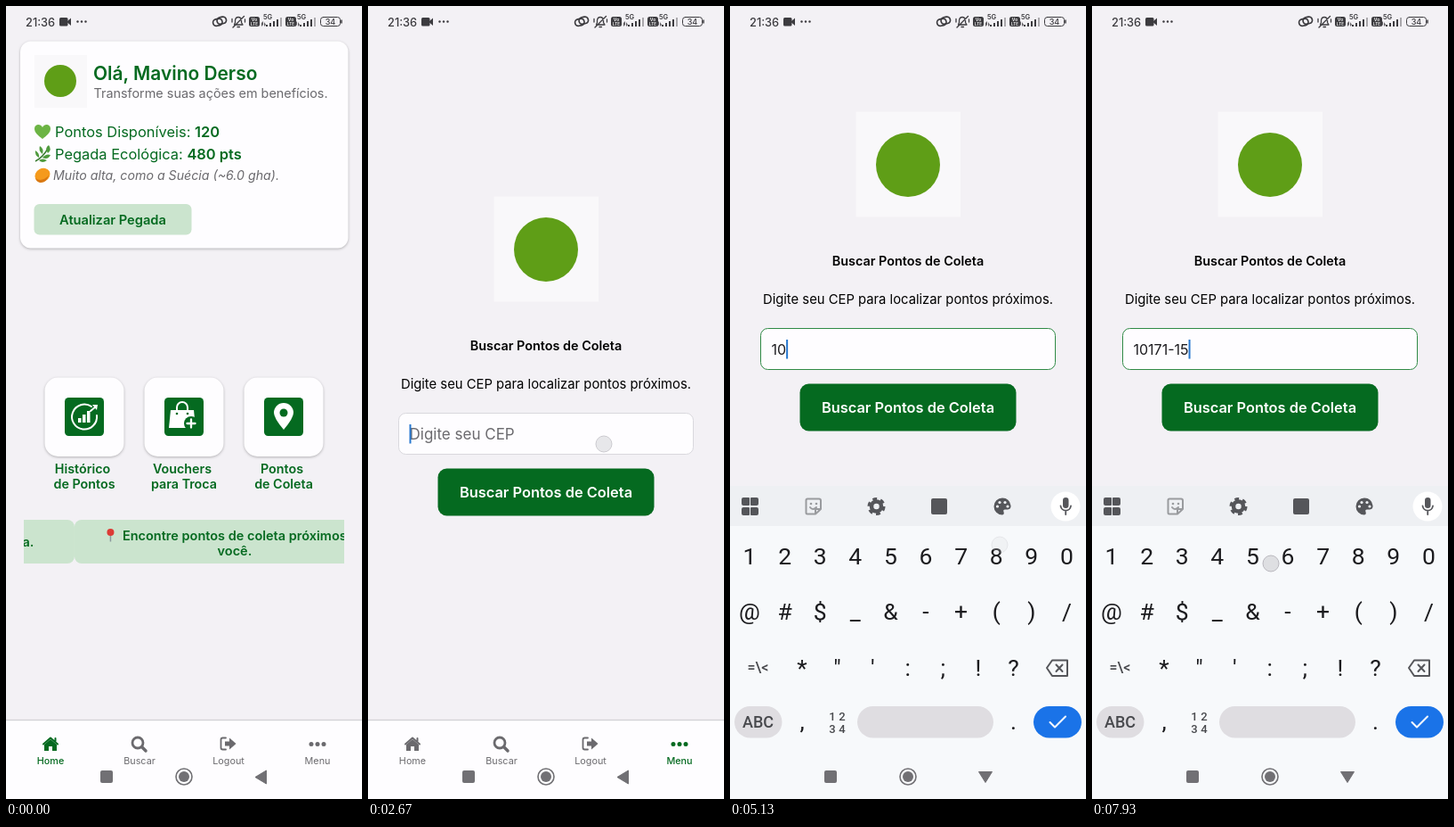
These frames come from a looping animation (400 px wide and 889 px high, 8 s). An HTML page:

```html
<!DOCTYPE html>
<html lang="pt-BR">
<head>
<meta charset="utf-8">
<title>Pontos de coleta</title>
<style>
  html, body { margin: 0; width: 100%; height: 100%; overflow: hidden; background: #f3f1f5; }
  svg { display: block; width: 400px; height: 889px; font-family: Inter, sans-serif; }
  .c { text-anchor: middle; }
  .m { font-weight: 500; }
  .b { font-weight: 600; }
  .green { fill: #056a20; }
  .grey { fill: #6b6a6e; }
  .line { fill: none; stroke: currentColor; stroke-linecap: round; stroke-linejoin: round; }
  .card { fill: #fefdff; filter: drop-shadow(0 1px 1.5px #0004); }
  .tab { color: #6b6a6e; fill: currentColor; font-size: 10.8px; text-anchor: middle; }
  .tab.on { color: #056a20; font-weight: 500; }
  #status { color: #3c3b3f; fill: #3c3b3f; }
  #keyboard { color: #55565a; fill: #55565a; }
  .keys { fill: #1c1c1f; font: 26.5px Roboto, sans-serif; text-anchor: middle; }
  .keys .small { font-size: 16px; font-weight: 500; fill: #48494d; }
  .keys .pill { font-size: 18px; font-weight: 500; fill: #48494d; }
</style>
</head>
<body>
<svg viewBox="0 0 400 889">
  <defs>
    <clipPath id="window"><rect x="20" y="576" width="360" height="49"/></clipPath>
    <g id="bars">
      <path d="M0 9h2v2h-2zM4 7h2v4h-2zM8 5h2v6h-2zM12 3h2v8h-2z"/>
      <path d="M16 1h2v10h-2z" opacity=".4"/>
      <text x="-3" y="3" font-size="7.5" class="b">5G</text>
      <path d="M-5 11v-4l2 -2v4zM-2 6v5l2 -2z" opacity=".8"/>
    </g>
    <g id="volte">
      <rect width="12" height="11" rx="2.5"/>
      <text x="6" y="5" font-size="5" class="c b" fill="#fff">Vo</text>
      <text x="6" y="9.6" font-size="4.5" class="c b" fill="#fff">LTE</text>
    </g>
  </defs>
  <rect width="400" height="889" fill="#f3f1f5"/>

  <g id="home">
    <rect class="card" x="16" y="39.5" width="368.5" height="232" rx="12"/>
    <rect x="32" y="55" width="59" height="59" fill="#f9f8fa"/>
    <circle cx="61" cy="84" r="18" fill="#5f9e17"/>
    <text class="green b" x="98" y="83" font-size="20.9">Olá, Mavino Derso</text>
    <text class="grey" x="98.5" y="103" font-size="14.4">Transforme suas ações em benefícios.</text>
    <path d="M41 149C36 145 32 142 32 137.5C32 132 39 131.5 41 136C43 131.5 50 132 50 137.5C50 142 46 145 41 149z" fill="#6cb444"/>
    <g fill="#4f9a3d">
      <path d="M33 174Q41 170 47 160" fill="none" stroke="#3d7d35" stroke-width="1.5"/>
      <path d="M47 165Q43 159 48 156Q52 161 47 165zM41 166Q36 162 38 157Q43 160 41 166zM37 170Q32 167 33 162Q38 165 37 170zM41 170Q45 165 50 167Q47 173 41 170zM37 173Q41 170 46 173Q41 177 37 173z"/>
    </g>
    <ellipse cx="41" cy="189.5" rx="8.8" ry="7.3" transform="rotate(-28 41 189.5)" fill="#f59a1c"/>
    <path d="M33 193Q40 198 48 190Q45 199 38 198Q34 197 33 193z" fill="#d97812"/>
    <g class="green" font-size="16.45">
      <text x="55" y="147">Pontos Disponíveis: <tspan class="b">120</tspan></text>
      <text x="55" y="172">Pegada Ecológica: <tspan class="b">480 pts</tspan></text>
    </g>
    <text class="grey" x="53" y="194.5" font-size="14.2" font-style="italic">Muito alta, como a Suécia (~6.0 gha).</text>
    <rect x="31.5" y="222" width="177" height="34.5" rx="6" fill="#cbe4ce"/>
    <text class="green b c" x="120" y="245" font-size="14.65">Atualizar Pegada</text>

    <g id="tiles"></g>

    <g clip-path="url(#window)">
      <g id="ticker" class="green b c" font-size="14.5">
        <g fill="#cbe4ce">
          <rect x="-283" y="576" width="360" height="49" rx="8"/>
          <rect x="77" y="576" width="360" height="49" rx="8"/>
          <rect x="437" y="576" width="360" height="49" rx="8"/>
        </g>
        <text x="25" y="606">a.</text>
        <path d="M117.5 591V600.5" stroke="#8b979c" stroke-width="1.5"/>
        <circle cx="117.5" cy="590" r="4" fill="#dc3b35"/>
        <text x="267.5" y="598.5">Encontre pontos de coleta próximos de</text>
        <text x="257" y="616">você.</text>
      </g>
    </g>
  </g>

  <g id="search">
    <rect x="141.5" y="213.5" width="117.5" height="118" fill="#f9f8fa"/>
    <circle cx="200" cy="273" r="36" fill="#5f9e17"/>
    <text class="b c" x="200" y="386" font-size="14.4">Buscar Pontos de Coleta</text>
    <text class="c" x="200" y="428.5" font-size="14.8">Digite seu CEP para localizar pontos próximos.</text>
    <rect id="field" x="34.5" y="456.5" width="331" height="46" rx="8" fill="#fefdff"/>
    <text id="value" x="46.5" y="486"></text>
    <rect id="caret" y="469" width="2" height="21.5" fill="#2878cf"/>
    <rect x="78.5" y="518.5" width="243" height="53" rx="10" fill="#056a20"/>
    <text class="b c" x="200" y="551" font-size="16.4" fill="#fff">Buscar Pontos de Coleta</text>
  </g>

  <g id="tabs">
    <rect y="800" width="400" height="89" fill="#fefdff"/>
    <rect y="799.8" width="400" height="1.4" fill="#d3d2d6"/>
    <g class="tab" id="homeTab">
      <path d="M50 822L57 828V835H52V830H48V835H43V828z"/>
      <path class="line" stroke-width="2" d="M42 827.5L50 820.5L58 827.5M55.5 821V824"/>
      <text x="50" y="850">Home</text>
    </g>
    <g class="tab">
      <circle class="line" cx="148" cy="826" r="6" stroke-width="2.8"/>
      <path class="line" stroke-width="3.5" d="M153 831L157 835"/>
      <text x="150" y="850">Buscar</text>
    </g>
    <g class="tab">
      <path class="line" stroke-width="1.8" d="M247 820.5H243.5Q241.5 820.5 241.5 822.5V831.5Q241.5 833.5 243.5 833.5H247"/>
      <path d="M246 824.5H251V820.5L258.5 827L251 833.5V829.5H246z"/>
      <text x="250" y="850">Logout</text>
    </g>
    <g class="tab" id="menuTab">
      <circle cx="343" cy="827.5" r="2.5"/><circle cx="350" cy="827.5" r="2.5"/><circle cx="357" cy="827.5" r="2.5"/>
      <text x="350" y="850">Menu</text>
    </g>
  </g>

  <g id="keyboard">
    <rect y="538" width="400" height="351" fill="#f7f9fb"/>
    <rect y="538" width="400" height="45" fill="#eef0f3"/>
    <path d="M15 551h6q1 0 1 1v7q0 1 -1 1h-6q-2 0 -2 -2v-5q0 -2 2 -2zM24 551h6q2 0 2 2v5q0 2 -2 2h-6q-1 0 -1 -1v-7q0 -1 1 -1zM15 562h6q1 0 1 1v7q0 1 -1 1h-6q-2 0 -2 -2v-5q0 -2 2 -2zM24 562h6q2 0 2 2v5q0 2 -2 2h-6q-1 0 -1 -1v-7q0 -1 1 -1z"/>
    <g opacity=".55">
      <path class="line" stroke-width="2" d="M87 552.5H100Q102 552.5 102 554.5V564L96 569.5H87Q85.5 569.5 85.5 568V554Q85.5 552.5 87 552.5M102 564H96V569.5M90 562Q93 566 97 562"/>
      <circle cx="91" cy="558" r="1.3"/><circle cx="97" cy="558" r="1.3"/>
    </g>
    <circle class="line" cx="164.5" cy="561" r="5.5" stroke-width="4.5"/>
    <circle class="line" cx="164.5" cy="561" r="8.3" stroke-width="3.5" stroke-dasharray="4.7 4" style="stroke-linecap:butt"/>
    <rect x="226" y="552" width="18" height="18" rx="2"/>
    <path d="M306 551.5A9.5 9.5 0 1 0 306 570.5Q308.5 570 307.5 567Q306.5 564.5 309 564.5H312Q316 564 315.5 560Q314 551.5 306 551.5z"/>
    <g fill="#eef0f3"><circle cx="300.5" cy="561" r="1.6"/><circle cx="303" cy="556.5" r="1.6"/><circle cx="309" cy="556.5" r="1.6"/><circle cx="312" cy="561" r="1.6"/></g>
    <circle cx="377" cy="561" r="16.5" fill="#fff"/>
    <rect x="374" y="551" width="6.5" height="12" rx="3.2"/>
    <path class="line" stroke-width="1.8" d="M371.5 560.5A5.8 5.8 0 0 0 383 560.5M377.2 567V570"/>
    <path class="line" stroke-width="2" d="M356 742L362 733.5H379V751H362zM366.5 738.5L373.5 746M373.5 738.5L366.5 746"/>
    <rect x="5" y="785" width="53.5" height="35.5" rx="17.7" fill="#dfdde1"/>
    <rect x="143" y="785" width="153" height="35.5" rx="17.7" fill="#dfdde1"/>
    <rect x="341" y="785" width="54" height="35.5" rx="17.7" fill="#1a73e8"/>
    <path class="line" style="stroke:#fff" stroke-width="2" d="M359.5 803L365 808.5L377 796.5"/>
    <g class="keys" id="letters">
      <path class="line" stroke-width="2" d="M32 733L24 742H28.5V750H35.5V742H40z"/>
      <text class="pill" x="31.5" y="809">?123</text>
      <circle class="line" cx="120" cy="803" r="9" stroke-width="1.8"/>
      <path class="line" stroke-width="1.8" d="M115.5 805.5Q120 811 124.5 805.5M117 800V800.5M123 800V800.5"/>
    </g>
    <g class="keys" id="symbols">
      <text class="small" x="31.5" y="747">=\&lt;</text>
      <text class="pill" x="31.5" y="809">ABC</text>
      <g class="small" style="font-size:13px">
        <text x="115" y="801">1</text><text x="126" y="801">2</text>
        <text x="115" y="815">3</text><text x="126" y="815">4</text>
      </g>
    </g>
    <g class="keys"><text x="81" y="811">,</text><text x="318.5" y="811">.</text></g>
  </g>

  <g fill="#717074">
    <rect x="106" y="857" width="14" height="14" rx="2"/>
    <circle cx="200" cy="864" r="9" fill="none" stroke="#717074" stroke-width="1.6"/>
    <circle cx="200" cy="864" r="6"/>
    <path id="back" stroke="#717074" stroke-linejoin="round"/>
  </g>

  <g id="status">
    <text x="22" y="23" font-size="12.8" class="m">21:36</text>
    <rect x="60" y="13" width="9.5" height="9.5" rx="1.5"/><path d="M69 17L73 13.5V22L69 18.5z"/>
    <circle cx="80.5" cy="17.5" r="1.2"/><circle cx="85" cy="17.5" r="1.2"/><circle cx="89.5" cy="17.5" r="1.2"/>
    <g class="line" stroke-width="1.7">
      <rect x="232.5" y="14.5" width="10.5" height="7.5" rx="3.7" transform="rotate(-12 238 18)"/>
      <rect x="237" y="12.5" width="10.5" height="7.5" rx="3.7" transform="rotate(-12 242 16)"/>
      <path stroke-width="1.3" d="M256.5 21H266L264.5 18.5V16Q264 12.5 261 12.5Q258 12.5 257.5 16V18.5zM260 23.5H262.5M255 24L267.5 11.5M254 14.5V18M268.5 15V18"/>
    </g>
    <use href="#volte" x="273" y="12"/>
    <use href="#bars" x="292" y="12"/>
    <use href="#volte" x="314" y="12"/>
    <use href="#bars" x="330" y="12"/>
    <rect class="line" x="353.5" y="12.5" width="22" height="10" rx="3"/>
    <path d="M377 15.5V19.5" stroke="#3c3b3f" stroke-width="1.5"/>
    <text class="c m" x="364.5" y="21" font-size="9">34</text>
  </g>

  <circle id="touch" r="9" fill="#d6d5da" fill-opacity=".75" stroke="#b9b8be"/>
</svg>
<script>
const $ = id => document.getElementById(id);
const show = (id, on) => { $(id).style.display = on ? '' : 'none'; };
const add = (id, markup) => $(id).insertAdjacentHTML('beforeend', markup);

// Home tiles
const tile = (x, first, second, icon) => add('tiles', `
  <g transform="translate(${x} 460)">
    <rect class="card" x="-44.5" y="-43.5" width="89" height="88.5" rx="15"/>
    <rect class="green" x="-22" y="-21" width="44" height="43" rx="4.5"/>
    <g fill="#fff" color="#fff">${icon}</g>
    <g class="green b c" font-size="14.3"><text x="-2" y="63.5">${first}</text><text y="80.5">${second}</text></g>
  </g>`);
tile(88, 'Histórico', 'de Pontos', `
  <path class="line" stroke-width="2" d="M8 -11A14 14 0 1 0 14 -1M7 -6L13 -11"/>
  <path d="M9 -13L15 -13L14 -7zM-7 2h3.5v5h-3.5zM-2 -2h3.5v9h-3.5zM3 -6h3.5v13h-3.5z"/>`);
tile(200, 'Vouchers', 'para Troca', `
  <path d="M-15 -7H11L13 13H-17z"/>
  <path class="line" stroke-width="2" d="M-8 -5V-10A6 6 0 0 1 4 -10V-5"/>
  <circle class="green" cx="8" cy="8" r="8"/>
  <path class="line" stroke-width="2.3" d="M8 3.5V12.5M3.5 8H12.5"/>
  <circle class="green" cx="-8" cy="-3" r="1.3"/><circle class="green" cx="4" cy="-3" r="1.3"/>`);
tile(312, 'Pontos', 'de Coleta', `
  <path d="M0 15Q-11 2 -11 -4A11 11 0 0 1 11 -4Q11 2 0 15z"/><circle class="green" cy="-4" r="4.5"/>`);

// Keyboard rows
const PITCH = 39.6;
const row = (id, chars, x, y) => [...chars].forEach((ch, i) =>
  add(id, `<text x="${x + i * PITCH}" y="${y}">${ch.replace('&', '&amp;')}</text>`));
row('letters', 'QWERTYUIOP', 22, 626);
row('letters', 'ASDFGHJKL', 42, 688);
row('letters', 'ZXCVBNM', 81, 751);
row('symbols', '1234567890', 22, 626);
row('symbols', '@#$_&-+()/', 22, 688);
row('symbols', '*"\':;!?', 81, 751);

const LOOP = 8000, CODE = '10171-15';
const OPEN_PAGE = 1600, FOCUS = 2600, KEYBOARD = 2800, RESIZE = 2870, SYMBOLS = 3730;
const typed = [[4470, 1], [5000, 2], [5640, 3], [6200, 4], [6740, 5], [7270, 7], [7860, 8]]; // time, length
const touches = [ // x, y, press, release
  [312, 462, 1330, 1450], [265, 491, 2530, 2620], [18, 791, 3600, 3740], [21, 616, 4400, 4470],
  [303, 604, 4930, 4990], [22, 616, 5560, 5640], [22, 616, 6130, 6200], [263, 618, 6650, 6730],
  [100, 616, 7200, 7270], [201, 625, 7740, 8000]];

function draw(t) {
  const onSearch = t >= OPEN_PAGE, keyboardUp = t >= KEYBOARD, resized = t >= RESIZE;
  show('home', !onSearch);
  show('search', onSearch);
  show('tabs', !resized);
  show('keyboard', keyboardUp);
  show('letters', t < SYMBOLS);
  show('symbols', t >= SYMBOLS);
  $('homeTab').classList.toggle('on', !onSearch);
  $('menuTab').classList.toggle('on', onSearch);
  $('ticker').setAttribute('transform', `translate(${-0.055 * t} 0)`);
  $('search').setAttribute('transform', `translate(0 ${resized ? -95 : 0})`);

  const left = 1 - Math.min(1, Math.max(0, (t - KEYBOARD) / 270));
  $('keyboard').setAttribute('transform', `translate(0 ${351 * left ** 3})`);
  $('back').setAttribute('d', keyboardUp ? 'M279.5 858.5H294.5L287 870.5z' : 'M280 864.5L292.5 857V872z');

  const [edited, length] = typed.findLast(([at]) => t >= at) || [FOCUS, 0];
  const value = $('value');
  value.textContent = length ? CODE.slice(0, length) : 'Digite seu CEP';
  value.setAttribute('font-size', length ? 16 : 17);
  value.setAttribute('fill', length ? '#1c1b1f' : '#6b6a6e');
  $('field').setAttribute('stroke', length ? '#2f8a45' : '#d9d8dd');
  show('caret', t >= FOCUS && (t - edited) % 1000 < 500);
  $('caret').setAttribute('x', 46.5 + (onSearch && length ? value.getComputedTextLength() : 0));

  const touch = touches.find(([, , press, release]) => t >= press && t < release + 200);
  show('touch', touch);
  if (touch) {
    const [x, y, , release] = touch;
    $('touch').setAttribute('cx', x);
    $('touch').setAttribute('cy', y);
    $('touch').setAttribute('opacity', 1 - Math.max(0, t - release) / 200);
  }
}

const start = performance.now();
function tick() {
  draw((performance.now() - start) % LOOP);
  requestAnimationFrame(tick);
}
tick();
</script>
</body>
</html>
```
